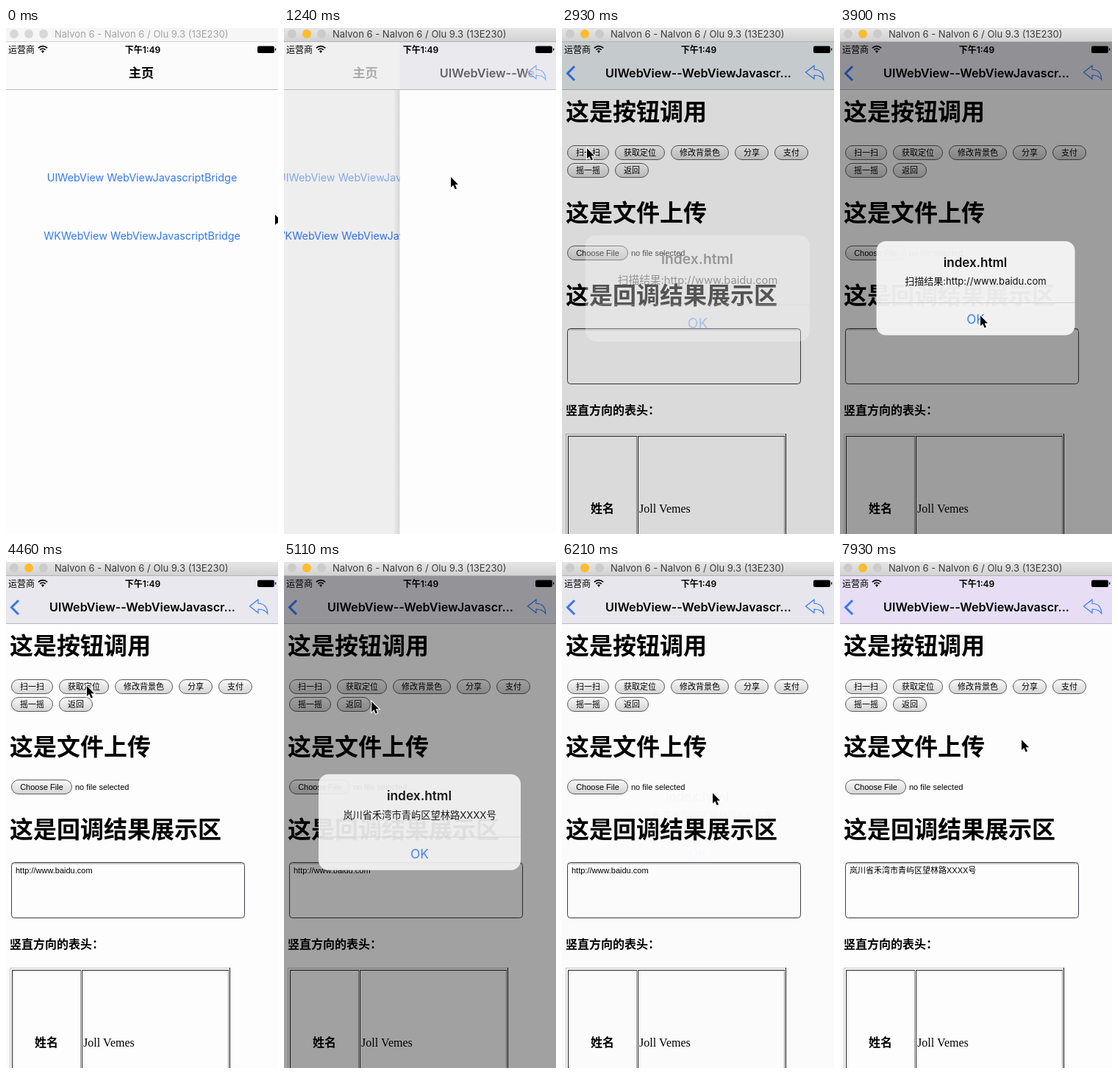
Write an HTML page with a canvas that moves like this. It is 370 px wide and 686 px high and loops after 7.99 s.

```html
<!DOCTYPE html>
<html lang="zh">
<head>
<meta charset="utf-8">
<title>Bridge demo</title>
<style>
html, body { margin: 0; width: 100%; height: 100%; overflow: hidden; background: #fdfdfd; }
canvas { display: block; width: 370px; height: 686px; }
</style>
</head>
<body>
<canvas id="stage"></canvas>
<script>
const W = 370, H = 686, LOOP = 7990;
const canvas = document.getElementById('stage');
const ratio = window.devicePixelRatio || 1;
canvas.width = W * ratio;
canvas.height = H * ratio;
const ctx = canvas.getContext('2d');

const UI = 'Inter, "Noto Sans CJK SC", "Noto Sans CJK", sans-serif';
const WEB = '"Liberation Sans", "Noto Sans CJK SC", "Noto Sans CJK", sans-serif';
const SERIF = '"Liberation Serif", serif';
const BLUE = '#3478f6';
const PAGE = '#fdfdfd';
const URL_TEXT = 'http://www.baidu.com';
const ADDRESS = '岚川省禾湾市青屿区望林路XXXX号';

const PUSH = 1135, LOADED = 1640;
const ALERTS = [
  { open: 2873, close: 3890, message: '扫描结果:' + URL_TEXT },
  { open: 4940, close: 5940, message: ADDRESS }
];
const FADE = 400;

// time, x, y
const POINTER = [
  [60, 366, 253], [430, 290, 172], [830, 227, 202], [1830, 227, 202],
  [2280, 34, 163], [3050, 34, 163], [3670, 191, 390], [3950, 191, 390],
  [4460, 110, 168], [5000, 110, 168], [5600, 212, 403], [5690, 202, 398],
  [5960, 202, 398], [6560, 210, 174], [6680, 197, 168], [7630, 197, 168],
  [7810, 235, 301], [7930, 247, 241]
];

const clamp = v => Math.max(0, Math.min(1, v));
const mix = (a, b, p) => a + (b - a) * p;

// System curve: cubic-bezier(.36, .66, .04, 1)
function ease(x) {
  if (x <= 0) return 0;
  if (x >= 1) return 1;
  const curve = (s, a, b) => 3 * (1 - s) * (1 - s) * s * a + 3 * (1 - s) * s * s * b + s * s * s;
  let lo = 0, hi = 1;
  for (let i = 0; i < 24; i++) {
    const mid = (lo + hi) / 2;
    if (curve(mid, 0.36, 0.04) < x) lo = mid; else hi = mid;
  }
  return curve(lo, 0.66, 1);
}

function text(str, x, y, font, color = '#000', align = 'left') {
  ctx.font = font;
  ctx.fillStyle = color;
  ctx.textAlign = align;
  ctx.fillText(str, x, y);
}

function rect(x, y, w, h, color) {
  ctx.fillStyle = color;
  ctx.fillRect(x, y, w, h);
}

function rounded(x, y, w, h, r) {
  ctx.beginPath();
  ctx.roundRect(x, y, w, h, r);
}

function disc(x, y, r, color) {
  ctx.beginPath();
  ctx.arc(x, y, r, 0, 7);
  ctx.fillStyle = color;
  ctx.fill();
}

function shade(x0, y0, x1, y1, from, to) {
  const g = ctx.createLinearGradient(x0, y0, x1, y1);
  g.addColorStop(0, from);
  g.addColorStop(1, to);
  return g;
}

function withAlpha(alpha, draw) {
  ctx.save();
  ctx.globalAlpha *= alpha;
  draw();
  ctx.restore();
}

function windowBar(active) {
  rect(0, 0, W, 18, active ? shade(0, 0, 0, 18, '#e6e6e6', '#d2d2d2') : '#f6f6f6');
  rect(0, 18, W, 1, active ? '#b4b4b4' : '#d6d6d6');
  const idle = active ? '#cbcbcb' : '#d8d8d8';
  [idle, active ? '#fdbc2e' : idle, idle].forEach((color, i) => disc(11 + 20 * i, 8, 6, color));
  text('Nalvon 6 - Nalvon 6 / Olu 9.3 (13E230)', 66, 13, '13px ' + UI, active ? '#3c3c3c' : '#a4a4a4');
}

function statusBar() {
  text('运营商', 3, 33.5, '12px ' + UI);
  ctx.strokeStyle = '#000';
  ctx.lineWidth = 1.7;
  for (const r of [5, 8.4]) {
    ctx.beginPath();
    ctx.arc(50, 33, r, -Math.PI * 0.76, -Math.PI * 0.24);
    ctx.stroke();
  }
  ctx.beginPath();
  ctx.moveTo(50, 34);
  ctx.arc(50, 33, 2.6, -Math.PI * 0.78, -Math.PI * 0.22);
  ctx.fillStyle = '#000';
  ctx.fill();
  text('下午1:49', 186, 33.5, '600 12px ' + UI, '#000', 'center');
  rounded(342, 24.5, 23, 9.5, 2);
  ctx.fill();
  rect(366, 27.5, 1.3, 3, '#000');
}

function chevron() {
  ctx.beginPath();
  ctx.moveTo(17, 52);
  ctx.lineTo(7.5, 61.5);
  ctx.lineTo(17, 71);
  ctx.strokeStyle = BLUE;
  ctx.lineWidth = 3;
  ctx.stroke();
}

function replyIcon() {
  ctx.beginPath();
  ctx.moveTo(331.5, 60);
  ctx.lineTo(343, 51);
  ctx.lineTo(343, 56.3);
  ctx.bezierCurveTo(351, 56.3, 355.5, 61, 355.8, 70);
  ctx.bezierCurveTo(353, 65.3, 349, 64, 343, 64);
  ctx.lineTo(343, 69);
  ctx.closePath();
  ctx.strokeStyle = BLUE;
  ctx.lineWidth = 1.1;
  ctx.stroke();
}

function barColor(t) {
  if (t < LOADED) return '#e9e9ee';
  if (t < 3700) return '#e4ebec';
  return t < 6500 ? '#e9e8ef' : '#e7def5';
}

function homePage(t, p) {
  rect(0, 19, W, H - 19, PAGE);
  const x = 185 - 0.3 * W * p;
  const font = '14.35px ' + UI;
  const press = t < 1010 ? 1 : mix(0.2, 1, clamp((t - 1080) / 350));
  withAlpha(press, () => text('UIWebView WebViewJavascriptBridge', x, 208, font, BLUE, 'center'));
  text('WKWebView WebViewJavascriptBridge', x, 287, font, BLUE, 'center');
  rect(0, 19, W, H - 19, `rgba(0,0,0,${0.1 * p})`);
}

function navBar(t, p) {
  const edge = W * (1 - p);
  const dim = Math.round(mix(251, 232, p));
  rect(0, 19, W, 64, `rgb(${dim},${dim},${dim})`);
  if (p > 0) rect(edge, 19, W - edge, 64, barColor(t));
  rect(0, 83, W, 1, '#b9b9bb');
  if (p < 1) {
    withAlpha(clamp(1 - 1.25 * p), () =>
      text('主页', 184 - 128 * p, 67, '600 17px ' + UI, '#000', 'center'));
  }
  if (p > 0) {
    const ink = p < 1 ? shade(325, 0, 345, 0, '#000', 'rgba(0,0,0,0)') : '#000';
    withAlpha(p, () => {
      text('UIWebView--WebViewJavascr...', 185.5 + edge * 0.97, 67, '600 16.2px ' + UI, ink, 'center');
      replyIcon();
    });
    withAlpha(clamp((p - 0.6) / 0.4), chevron);
  }
}

function button(x, y, w, label, h = 19) {
  rounded(x + 0.5, y + 0.5, w - 1, h, 9.5);
  ctx.fillStyle = shade(0, y, 0, y + h, '#fbfbfb', '#d6d6d6');
  ctx.fill();
  ctx.strokeStyle = '#5c5c5c';
  ctx.lineWidth = 1;
  ctx.stroke();
  text(label, x + w / 2, y + h / 2 + 4.3, '11px ' + WEB, '#000', 'center');
}

function inset(x, y, w, h) {
  rect(x, y, w, 1, '#222');
  rect(x, y, 1, h, '#222');
  rect(x + w - 1, y + 1, 1, h, '#8c8c8c');
}

function webPage(t) {
  rect(0, 84, W, H - 84, PAGE);
  const title = 'bold 32px ' + WEB;
  text('这是按钮调用', 5, 125, title);
  text('这是文件上传', 5, 262, title);
  text('这是回调结果展示区', 5, 374, title);

  button(7, 159, 57, '扫一扫');
  button(72, 159, 68, '获取定位');
  button(148, 159, 79, '修改背景色');
  button(235, 159, 46, '分享');
  button(289, 159, 46, '支付');
  button(7, 183, 57, '摇一摇');
  button(72, 183, 46, '返回');
  button(7, 295, 83, 'Choose File');
  text('no file selected', 94, 309, '11px ' + WEB);

  rounded(7.5, 407.5, 317, 75, 4);
  ctx.strokeStyle = '#3c3c44';
  ctx.lineWidth = 1;
  ctx.stroke();
  rect(9, 408, 314, 2, 'rgba(60,60,75,.22)');
  const result = t < 4280 ? '' : t < 6340 ? URL_TEXT : ADDRESS;
  text(result, 13, 421.5, '11px ' + WEB);

  text('竖直方向的表头：', 5, 524, 'bold 16px ' + WEB);
  rect(5, 550, 300, 1, '#c4c4c4');
  rect(5, 550, 1, 136, '#c4c4c4');
  rect(304, 550, 1, 136, '#111');
  inset(8, 553, 94, 133);
  inset(103, 553, 200, 133);
  text('姓名', 55, 657, 'bold 16px ' + WEB, '#000', 'center');
  text('Joll Vemes', 105, 657, '16px ' + SERIF);
}

function alertBox({ open, close, message }, t) {
  if (t < open || t > close + FADE) return;
  const shown = ease((t - open) / FADE);
  const alpha = t < close ? shown : 1 - ease((t - close) / FADE);
  const scale = 1.2 - 0.2 * shown;
  rect(0, 19, W, H - 19, `rgba(0,0,0,${0.4 * alpha})`);
  withAlpha(alpha, () => {
    ctx.translate(184.5, 352.5);
    ctx.scale(scale, scale);
    ctx.translate(-184.5, -352.5);
    rounded(49.5, 289, 270, 127.5, 13);
    ctx.fillStyle = '#f6f6f7';
    ctx.fill();
    text('index.html', 184, 324, '600 17px ' + UI, '#000', 'center');
    text(message, 184.5, 348, '13px ' + UI, '#000', 'center');
    rect(49.5, 372, 270, 1, '#cfcfd2');
    text('OK', 184.5, 401, '17px ' + UI, BLUE, 'center');
  });
}

function pointerAt(t) {
  const next = POINTER.findIndex(k => k[0] > t);
  if (next === 0) return POINTER[0].slice(1);
  if (next < 0) return POINTER[POINTER.length - 1].slice(1);
  const [t0, x0, y0] = POINTER[next - 1];
  const [t1, x1, y1] = POINTER[next];
  const u = (t - t0) / (t1 - t0);
  const p = u * u * (3 - 2 * u);
  return [mix(x0, x1, p), mix(y0, y1, p)];
}

function pointer(t) {
  const [x, y] = pointerAt(t);
  ctx.save();
  ctx.translate(x, y);
  ctx.beginPath();
  ctx.moveTo(0, 0);
  ctx.lineTo(0, 14);
  ctx.lineTo(3.2, 11);
  ctx.lineTo(5.6, 16.6);
  ctx.lineTo(8, 15.6);
  ctx.lineTo(5.6, 10.2);
  ctx.lineTo(10, 10.2);
  ctx.closePath();
  ctx.strokeStyle = '#fff';
  ctx.lineWidth = 2;
  ctx.stroke();
  ctx.fillStyle = '#000';
  ctx.fill();
  ctx.restore();
}

function draw(t) {
  ctx.setTransform(ratio, 0, 0, ratio, 0, 0);
  const p = ease((t - PUSH) / 500);
  const edge = W * (1 - p);
  if (p < 1) homePage(t, p);
  if (p > 0 && p < 1) {
    rect(edge - 9, 84, 9, H - 84, shade(edge - 9, 0, edge, 0, 'rgba(0,0,0,0)', 'rgba(0,0,0,.1)'));
    rect(edge, 84, W - edge, H - 84, PAGE);
  }
  if (p === 1) {
    rect(0, 19, W, H - 19, PAGE);
    if (t >= LOADED) webPage(t);
  }
  navBar(t, p);
  statusBar();
  ALERTS.forEach(a => alertBox(a, t));
  windowBar(t >= 1010);
  pointer(t);
}

const start = performance.now();
function tick() {
  draw((performance.now() - start) % LOOP);
  requestAnimationFrame(tick);
}
tick();
</script>
</body>
</html>
```
